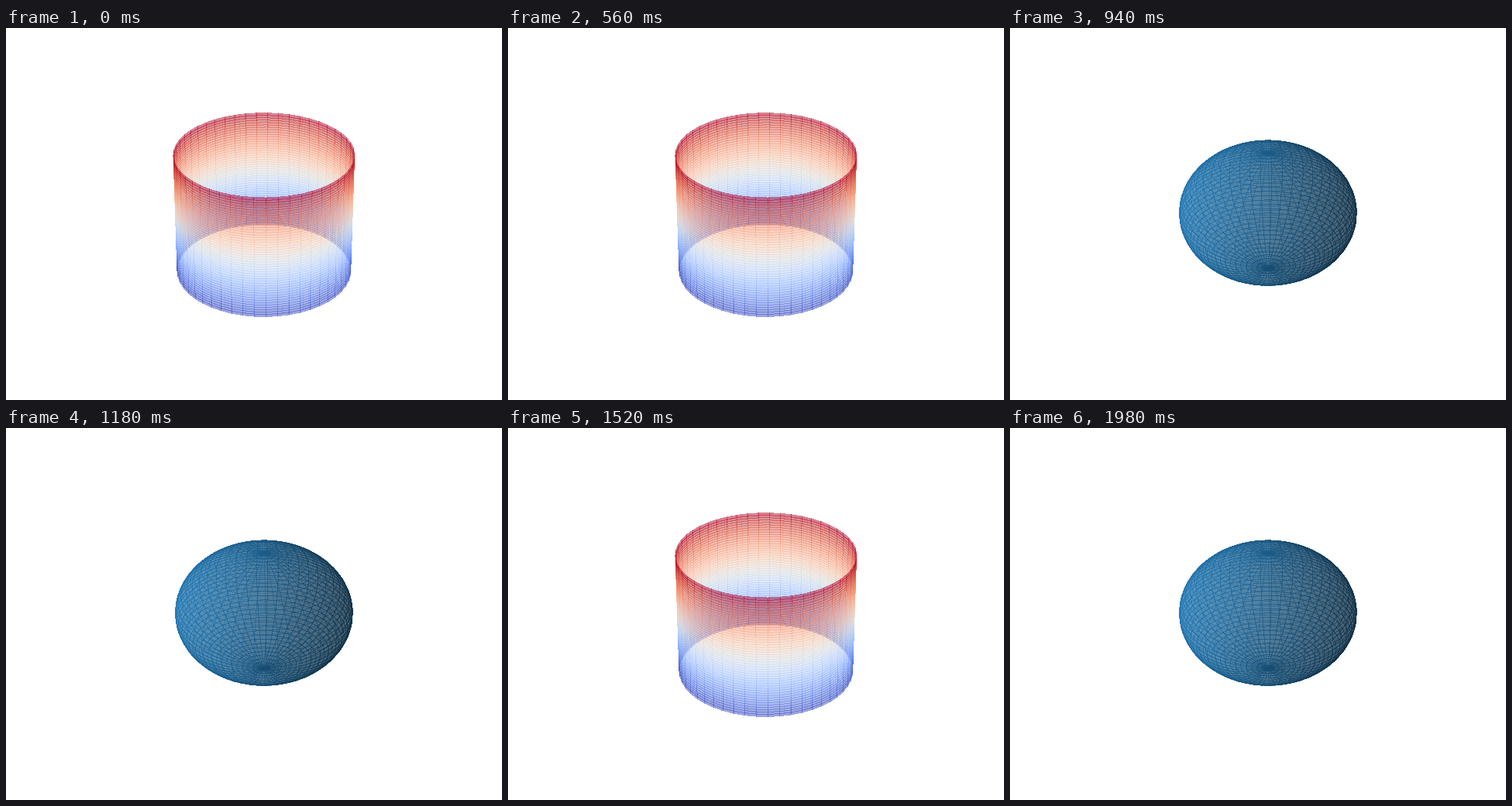
A matplotlib script that plays this animation: 640x480 px, repeating every 2000 ms.

```python
import numpy as np
import matplotlib.pyplot as plt
from matplotlib.animation import FuncAnimation

POINTS = 50
FRAMES = 100
STYLE = dict(alpha=0.5, linewidth=0, antialiased=False)

fig = plt.figure(figsize=(6.4, 4.8), dpi=100)
ax = fig.add_subplot(projection="3d")
ax.margins(0)
ax.set_axis_off()

theta = np.linspace(0, 2 * np.pi, POINTS)


def draw_cylinder():
    angle, z = np.meshgrid(theta, np.linspace(-1, 1, POINTS))
    return ax.plot_surface(np.cos(angle), np.sin(angle), z,
                           cmap="coolwarm", **STYLE)


def draw_sphere():
    phi = np.linspace(0, np.pi, POINTS)
    x = np.outer(np.cos(theta), np.sin(phi))
    y = np.outer(np.sin(theta), np.sin(phi))
    z = np.outer(np.ones(POINTS), np.cos(phi))
    return ax.plot_surface(x, y, z, color="C0", **STYLE)


shapes = [draw_cylinder(), draw_sphere()]


def update(i):
    for k, shape in enumerate(shapes):
        shape.set_visible(i % 2 == k)
    return shapes


anim = FuncAnimation(fig, update, frames=FRAMES, interval=20,
                     repeat=True, repeat_delay=0)
plt.show()
```
